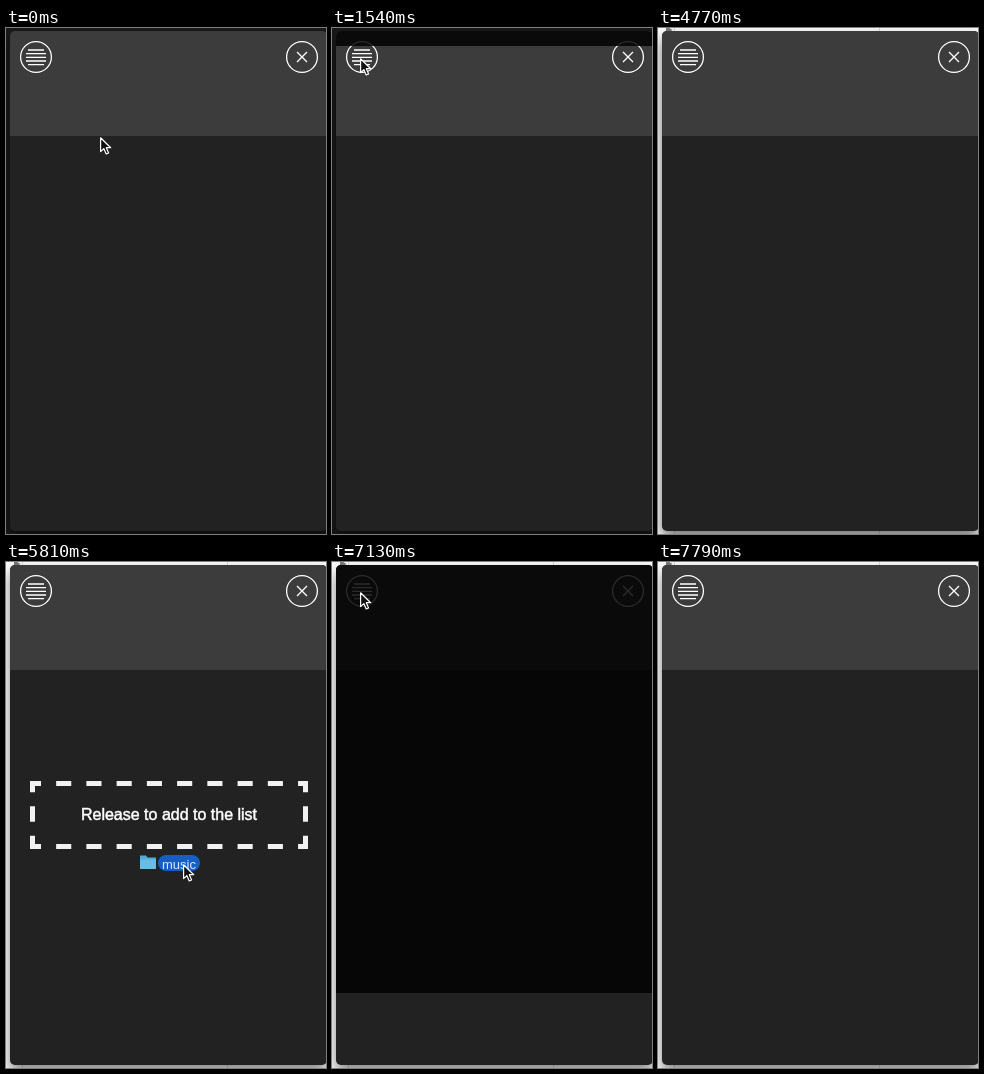
Animation, 320 px wide and 506 px high, one loop 8 s. Source, as an HTML page:

```html
<!DOCTYPE html>
<html lang="en">
<head>
<meta charset="utf-8">
<title>Drop window</title>
<style>
  html, body { margin: 0; width: 100%; height: 100%; overflow: hidden; background: #fdfdfd; }
  #stage { position: relative; width: 320px; height: 506px; overflow: hidden; }
  svg { position: absolute; left: 0; top: 0; display: block; }
  #dark { position: absolute; inset: 0; background: #191919; }
  #window {
    position: absolute; left: 4px; top: 3px; width: 317px; height: 500px;
    border-radius: 5px; overflow: hidden; background: #222;
    box-shadow: 0 7px 14px rgba(0, 0, 0, .55);
  }
  #window.settled { box-shadow: 0 7px 14px rgba(0, 0, 0, .48); }
  #header { height: 105px; background: #3c3c3c; }
  #menu { position: absolute; inset: 0; background: rgba(0, 0, 0, .83); }
  text { font-family: "Liberation Sans", Arial, sans-serif; }
</style>
</head>
<body>
<div id="stage">
  <svg width="320" height="506">
    <path d="M16.5 0V506M221.5 0V506" stroke="#dadada"/>
    <path d="M8 -2l6.5 4-6.5 4zM8 88l6.5 4-6.5 4zM8 106l6.5 4-6.5 4z" fill="#7a7a7a"/>
  </svg>
  <div id="dark"></div>
  <div id="window">
    <div id="header"></div>
    <svg width="317" height="500" viewBox="4 3 317 500" fill="none" stroke="#fff" stroke-width="1.3">
      <g id="burger">
        <circle cx="30" cy="29" r="15.4"/>
        <path d="M22 22H38M20 25.7H40M20 29.4H40M20 33H40M22 36.6H38"/>
      </g>
      <circle cx="296" cy="29" r="15.4"/>
      <path d="M291 24l10 10M301 24l-10 10"/>
    </svg>
    <div id="menu">
      <svg width="317" height="500" viewBox="4 3 317 500" fill="none" stroke="#fff" stroke-width="1.3">
        <use href="#burger"/>
        <rect x="62.5" y="25.5" width="19" height="19" rx="2" stroke="#444" stroke-width="1"/>
      </svg>
    </div>
  </div>
  <svg width="320" height="506">
    <g id="zone">
      <g stroke="#f1f1f1" stroke-width="5">
        <path d="M24 221.5H302M24 284.5H302" stroke-dasharray="15.12 15.12" stroke-dashoffset="4.1"/>
        <path d="M26.5 219V287M299.5 219V287" stroke-dasharray="15.5 14" stroke-dashoffset="4.2"/>
      </g>
      <text x="163" y="258" font-size="16" text-anchor="middle" fill="#fff" stroke="#fff" stroke-width=".5">Release to add to the list</text>
    </g>
    <g id="pointer">
      <g id="folder">
        <path d="M-43 -8.5h6l1.5 2h8.5V5h-16z" fill="#55a9d2"/>
        <path d="M-43 -4.5h16V5h-16z" fill="#6bbce2"/>
        <rect x="-25" y="-9" width="42" height="16" rx="8" fill="#155fc4"/>
        <text x="-21" y="4.5" font-size="13" fill="#dfe8f6">music</text>
      </g>
      <path d="M.6 .8V14.6L3.8 11.6 6.2 17 8.6 16 6.3 10.7H10.7z" fill="#111" stroke="#fff" stroke-width="1.2" stroke-linejoin="round"/>
    </g>
  </svg>
</div>
<script>
const LOOP = 8000;
const $ = id => document.getElementById(id);
const [dark, win, menu, zone, pointer, folder] =
  ["dark", "window", "menu", "zone", "pointer", "folder"].map($);

const CUT = 2820, BACK = 4770, SETTLE = 4830, DROP = 6170;

// Pointer stops: time, x, y
const firstPath = [[10, 94, 109], [100, 23, 59], [230, 23, 59], [600, 28, 30]];
const secondPath = [
  [5220, -25, 340], [5500, 95, 316], [5810, 177, 302], [5930, 177, 305],
  [6150, 177, 305], [6420, 62, 120], [6590, 9, 38], [6680, 11, 23], [6810, 28, 30]
];
// Menu slides: start, duration, from, to (vertical offset)
const slides = [
  [735, 366, -500, 0], [1345, 335, 0, -500],
  [6977, 400, -500, 0], [7485, 355, 0, -500]
];

const clamp = v => Math.min(1, Math.max(0, v));
const ramp = (t, start, length) => clamp((t - start) / length);
const easeOut = p => 1 - (1 - p) ** 4;
const show = (el, on) => { el.style.display = on ? "" : "none"; };

function along(path, t) {
  let [, x, y] = path[0];
  for (let i = 1; i < path.length; i++) {
    const [t0, x0, y0] = path[i - 1], [t1, x1, y1] = path[i];
    if (t < t0) break;
    const p = ramp(t, t0, t1 - t0);
    x = x0 + (x1 - x0) * p;
    y = y0 + (y1 - y0) * p;
  }
  return [Math.round(x), Math.round(y)];
}

function menuOffset(t) {
  let y = -500;
  for (const [start, length, from, to] of slides) {
    if (t >= start) y = from + (to - from) * easeOut(ramp(t, start, length));
  }
  return Math.round(y);
}

function draw(t) {
  show(dark, t < CUT);
  show(win, t < CUT || t >= BACK);
  win.classList.toggle("settled", t >= SETTLE);
  menu.style.transform = `translateY(${menuOffset(t)}px)`;

  const zoneAlpha = ramp(t, 5340, 150) * (1 - ramp(t, DROP, 150));
  zone.setAttribute("opacity", zoneAlpha);

  show(pointer, t < CUT || (t >= 5250 && t < 7780));
  show(folder, t >= 5250 && t < DROP);
  const [x, y] = along(t < CUT ? firstPath : secondPath, t);
  pointer.setAttribute("transform", `translate(${x} ${y})`);
}

const begin = performance.now();
function tick() {
  draw((performance.now() - begin) % LOOP);
  requestAnimationFrame(tick);
}
draw(0);
requestAnimationFrame(tick);
</script>
</body>
</html>
```
